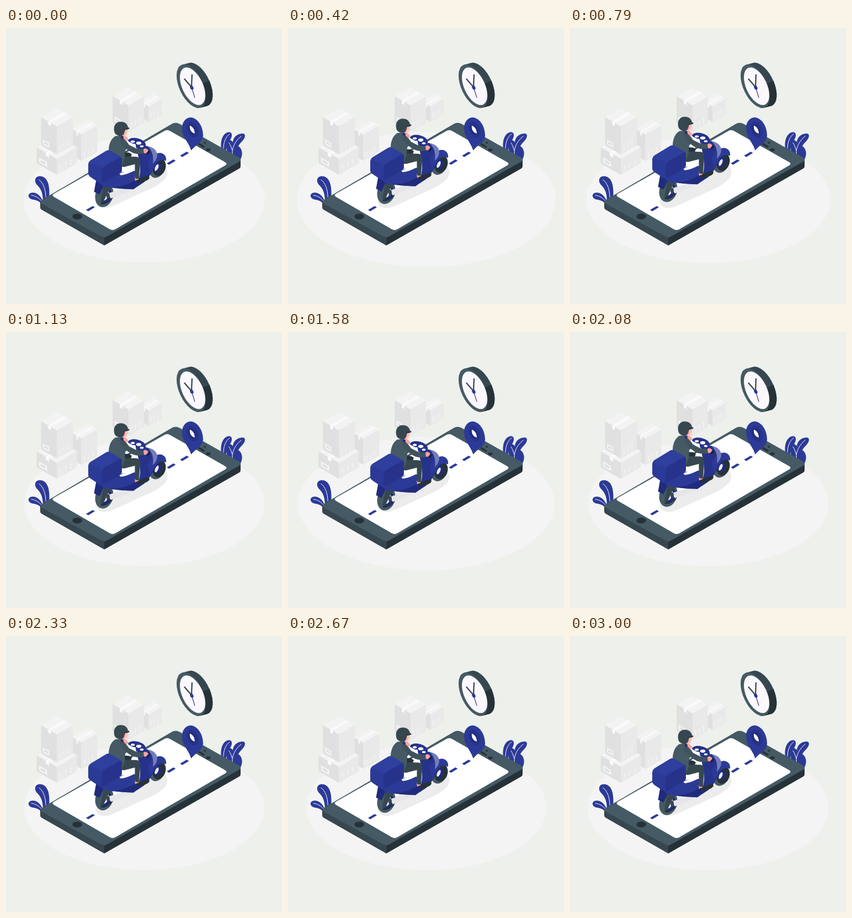
Recreate the animation shown at these times as an HTML page. Size 500 by 500 pixels, loop 3040 ms.

```html
<!DOCTYPE html>
<html lang="en">
<head>
<meta charset="utf-8">
<title>Delivery scooter</title>
<style>
  html, body { margin: 0; width: 100%; height: 100%; overflow: hidden; background: #edf0eb; }
  svg { display: block; width: 100vw; height: 100vh; }
  .lit { fill: #2f3f9d; }
  .blue { fill: #2c3a97; }
  .mid { fill: #27338a; }
  .navy { fill: #212b7c; }
  .slate { fill: #455a64; }
  .sleeve { fill: #40535c; }
  .steel { fill: #37474f; }
  .ink { fill: #263238; }
  .skin { fill: #fba39e; }
  .white { fill: #fff; }
  .vein { fill: none; stroke: #fff; stroke-width: 1; stroke-linecap: round; }
  .top { fill: #f3f3f3; }
  .left { fill: #e0e0e0; }
  .right { fill: #e9e9e9; }
  .tape { fill: #fafafa; }
  .mark { fill: none; stroke: #f6f6f6; stroke-width: .9; }
</style>
</head>
<body>
<svg viewBox="0 0 500 500" xmlns="http://www.w3.org/2000/svg">
  <defs>
    <clipPath id="lowerRim"><path d="M350 104L380 90V150H340Z"/></clipPath>
    <path id="rim" d="M319.300 66.500L332.800 63A21.500 42.400 -25 0 1 365.200 141L351.700 144.500Z"/>
  </defs>

  <ellipse id="floor" cx="250.500" cy="311" rx="217.500" ry="113.500" fill="#f4f4f4"/>
  <g id="parcels"></g>

  <g id="plants">
    <path class="blue" d="M78 311C80 292 78 269 62 268.500C52 268 50 278 57 285C65 293 67 302 67 316Z"/>
    <path class="vein" d="M72 306C72 292 67 280 60 275"/>
    <path class="blue" d="M68 319C65 304 55 297 46 298.500C39 300 39 308 47 310.500C55 312 60 313 64 319Z"/>
    <path class="vein" d="M65 314C59 307 53 304 46 303"/>
    <path class="blue" d="M391 224C387 208 391 190 404 188.500C411 189 410 197 406 203C400 210 400 217 398 228Z"/>
    <path class="vein" d="M394 218C394 207 398 197 405 192"/>
    <path class="blue" d="M399 229C402 222 398 215 401 208C403 202 408 202 411 207C411 198 420 190 431 191.500C435 194 432 201 428 205C424 209 422 211 421 214C426 217 431 226 425 238L418 238Z"/>
    <path class="vein" d="M410 228C409 216 416 204 426 196M409.500 221C408 215 406 211 404 208"/>
  </g>

  <g id="phone">
    <path class="steel" d="M62 314V325Q62 328 66 330L178 394V378Z"/>
    <path class="ink" d="M178 379L425 237V250Q425 253.500 421 255.500L178 394Z"/>
    <path class="slate" d="M68 309.500L300 174Q307 169.500 315 174L421 234Q429 239 421 243L186 376Q178 381 170 376L67 319.500Q58 315 68 309.500Z"/>
    <path class="white" d="M87 300L286 187Q292 183 298 187L397 243Q402 246 397 249L199 364Q193 368 187 364L87 306Q82 303 87 300Z"/>
    <ellipse class="ink" cx="129" cy="341.500" rx="9" ry="5.200"/>
    <path d="M350.500 210.500L358 215" stroke="#263238" stroke-width="3.600" stroke-linecap="round"/>
    <ellipse class="ink" cx="366.500" cy="220.700" rx="4.200" ry="2.600"/>
    <ellipse class="ink" cx="360.300" cy="208" rx="2.200" ry="1.400"/>
  </g>
  <g id="dashes" class="blue"></g>

  <g id="clock">
    <use href="#rim" class="steel"/>
    <use href="#rim" class="ink" clip-path="url(#lowerRim)"/>
    <ellipse class="slate" rx="21.500" ry="42.400" transform="translate(335.500 105.500) rotate(-25)"/>
    <ellipse fill="#faf8fc" rx="18.800" ry="36.600" transform="translate(338 105.500) rotate(-25)"/>
    <path d="M336 107L323.500 92.500M336 107L337 85" stroke="#37474f" stroke-width="2.300" stroke-linecap="round"/>
    <path d="M336 107L342 126" stroke="#2c3a97" stroke-width="1.200" stroke-linecap="round"/>
    <ellipse class="blue" rx="2.900" ry="4.200" transform="translate(336.500 108) rotate(-25)"/>
  </g>

  <path id="shadow" fill="#ececec" d="M162 312C163 324 172 328 186 325C202 320 222 309 242 300C264 291 284 281 291 269C295 259 290 250 282 248L252 262L196 290Z"/>

  <g id="pin">
    <path class="blue" d="M335.500 222C331 206 319 199 319 181C319 170 326 162 335 162C347 163 357 178 357 194C357 207 344 211 335.500 222Z"/>
    <ellipse class="mid" rx="10" ry="15" transform="translate(338 184) rotate(-22)"/>
    <ellipse class="navy" rx="6" ry="9.500" transform="translate(337 184) rotate(-22)"/>
    <path class="white" d="M333 177C338 178 342 184 342 191C336 190 332 184 333 177Z"/>
  </g>

  <g id="scooter">
    <g id="frontWheel">
      <ellipse class="slate" rx="13.500" ry="17.500" transform="translate(273 254.500) rotate(18)"/>
      <ellipse class="ink" rx="11.500" ry="16" transform="translate(277.500 252.500) rotate(18)"/>
      <ellipse class="navy" rx="6" ry="9.500" transform="translate(275 252.500) rotate(18)"/>
      <ellipse fill="#e8eaf2" rx="2.800" ry="6.500" transform="translate(273 253) rotate(24)"/>
    </g>
    <g id="rearWheel">
      <ellipse class="slate" rx="16" ry="22" transform="translate(178 303) rotate(16)"/>
      <path class="ink" d="M171 318C176 323 191 315 196 304L185 304Z"/>
      <ellipse class="navy" rx="8" ry="13" transform="translate(183 304) rotate(16)"/>
      <ellipse fill="#e8eaf2" rx="5" ry="10" transform="translate(180.500 303) rotate(20)"/>
    </g>
    <path class="navy" d="M164 272L159.500 297L169.500 302L177 286L192 280Z"/>
    <path class="steel" d="M177 285L193 288L185 297L176 316L171 315Z"/>
    <path fill="#e6e6ea" d="M184 300C198 296 208 291 232 289L230 293C218 298 206 304 190 309Z"/>
    <ellipse class="steel" cx="185" cy="304" rx="3" ry="5.500"/>

    <path class="blue" d="M172 283C180 275 195 267 211 261L234 259L237 274L262 261C260 273 250 280 240 285L230 292C214 292 194 291 177 287Z"/>
    <path class="navy" d="M190 288.500C206 289 222 284 238 274L259 269C256 278 245 282 231 292.500C216 292 203 291 190 288.500Z"/>
    <path class="mid" d="M238 214L256 214C267 220 276 231 272 246C266 257 262 268 254 275L240 276C245 262 243 245 239 230Z"/>
    <path class="blue" d="M257 246C261 233 271 226 280 226.500C288 228 291 234 290 241L285 239.500C275 238 268 248 261 264Z"/>
    <path fill="#747dbb" d="M257 214.500C267 216 274 222 274 231C273 239 269 243 266 246C268 233 265 223 257 214.500Z"/>
    <path class="white" d="M205 264C215 261 227 253 235 248L235 257C227 262 217 266 208 267Z"/>

    <g id="dashboard">
      <path class="mid" d="M221 204C224 197 239 198 248 204C255 209 255 216 248 219L236 218C229 216 222 211 221 204Z"/>
      <g class="white">
        <ellipse cx="229.700" cy="205.800" rx="3.600" ry="2"/>
        <ellipse cx="240.500" cy="208.600" rx="4.700" ry="2.800"/>
        <ellipse cx="246" cy="214.500" rx="3.300" ry="1.900"/>
        <ellipse cx="232" cy="211.500" rx="3" ry="1.800"/>
      </g>
    </g>

    <g id="rider">
      <path class="ink" d="M212 225L223 226L228 229L226 234L212 236Z"/>
      <path class="skin" d="M233 270L240.500 270L240 277L234 277Z"/>
      <path class="ink" d="M235 276.500C242 274 248 270 257 268C261 269 261 273 256 276C250 279 241 281 235 279Z"/>
      <path class="steel" d="M198 238L214 233L236 233.500C243 234 244 239 243 245L241 272.500Q237 274.500 233.500 272L233.500 247L214 252C206 252 200 247 198 238Z"/>
      <path class="white" d="M212 201L219 204L235 212.500L236 219L222 214Z"/>
      <path class="skin" d="M206 192L214 194L222 201L219 205L208 200Z"/>
      <path class="slate" d="M187 232C184 217 188 202 198 196L207 195C214 200 219 208 221 217L216 222L215 236L210 250L198 250Z"/>
      <path class="sleeve" d="M206 198C214 199 219 206 223 212L236 218.500L250 220L251 227Q241 230 231 227C221 223 213 215 208 208Z"/>
      <path class="navy" d="M208 194.500L213 197L212 202L208 199Z"/>
      <path class="skin" d="M249 220C252 217 256 219 257.500 222C257 226 253 228 250 227Z"/>
      <path d="M256.500 227.500L259.500 224" stroke="#1c2440" stroke-width="4" stroke-linecap="round"/>
      <path class="skin" d="M208 180L219 181L219.500 188C219.500 194 216 196 211 196L207 194Z"/>
      <path d="M217 184L218 191L214 195" fill="none" stroke="#fff" stroke-width="1.200" opacity=".65"/>
      <path class="steel" d="M196 187C194 176 200 170 208 170C215 170 220 174 221 180L224 181.500Q222 184 216 184.500C214 189 214 195 209 195.500C202 196 197 193 196 187Z"/>
      <path d="M214 184Q219 184 223 182" fill="none" stroke="#263238" stroke-width="1.400"/>
    </g>

    <g id="cargo">
      <path class="lit" d="M149 248Q149 243 153 240L181 223Q185 220.500 190 223L207 233Q211 236 210 241L208 262L176 281Q172 283 168 280L153 270Q149 267 149 263Z"/>
      <path class="mid" d="M173 259Q174 253 179 250L206 235Q210 234 210 238V258Q210 261 206 264L178 280Q173 283 173 277Z"/>
      <path class="blue" d="M149 248Q150 245 154 246L169 250Q174 252 173 259V277Q173 283 168 280L153 270Q149 267 149 263Z"/>
    </g>
  </g>
</svg>
<script>
  const byId = id => document.getElementById(id);
  const poly = (cls, points) => `<polygon class="${cls}" points="${points.join(' ')}"/>`;

  // Isometric carton: (x, y) is the near top corner, a and b its left and right widths.
  function carton(x, y, a, b, h, label) {
    const k = 0.575;
    const at = (u, v, z = 0) => [x - a * u + b * v, y - k * (a * u + b * v) + z];
    let out = poly('left', [at(1, 0), at(0, 0), at(0, 0, h), at(1, 0, h)])
      + poly('right', [at(0, 0), at(0, 1), at(0, 1, h), at(0, 0, h)])
      + poly('top', [at(0, 0), at(1, 0), at(1, 1), at(0, 1)])
      + poly('tape', [at(.55, 0), at(.38, 0), at(.38, 1), at(.55, 1)])
      + poly('tape', [at(.55, 0), at(.38, 0), at(.38, 0, 6), at(.55, 0, 6)]);
    if (label) {
      out += poly('top', [at(.88, 0, h - 13), at(.48, 0, h - 13), at(.48, 0, h - 4), at(.88, 0, h - 4)]);
      out += poly('left', [at(.8, 0, h - 10.5), at(.56, 0, h - 10.5), at(.56, 0, h - 6.5), at(.8, 0, h - 6.5)]);
    }
    for (const v of [.2, .45, .7]) {
      const [mx, my] = at(0, v, h - 5);
      out += `<path class="mark" d="M${mx} ${my}v-8m-2 3l2-3 2 1M${mx - 2} ${my + 1}l4-2"/>`;
    }
    return out;
  }

  byId('parcels').innerHTML =
    carton(258, 142, 16, 24, 28, false)
    + carton(222, 140, 29, 28, 48, true)
    + carton(136.5, 193, 16.5, 29, 48, false)
    + carton(92, 237, 36.5, 36.5, 29, true)
    + carton(92, 178, 28.5, 29, 51, true);

  byId('dashes').innerHTML = [[145, 329.6], [291.3, 245.3], [315.3, 231.3]]
    .map(([x, y]) => `<path d="M${x} ${y}l12-7.200 4 2.400-12 7.200z"/>`).join('');

  const LOOP = 3040, STEP = 1000 / 24, CYCLE = 3000, LEAD = 12;
  const beat = [[0, 1], [.1, 1.1], [.3, 1], [.4, 1], [.5, 1.1], [.6, 1], [1, 1]];

  function along(keys, p) {
    const i = keys.findIndex(([at]) => at > p);
    const [p0, v0] = keys[i - 1], [p1, v1] = keys[i];
    return v0 + (v1 - v0) * (p - p0) / (p1 - p0);
  }

  function draw(ms) {
    const step = Math.min(72, Math.floor((ms % LOOP + 5) / STEP));
    const p = (step * STEP + LEAD) % CYCLE / CYCLE;
    const lift = 10 * (1 - Math.abs(1 - 2 * (p * 2 % 1)));
    const scale = along(beat, p);
    byId('scooter').setAttribute('transform', `translate(0 ${-lift})`);
    byId('floor').setAttribute('rx', 217.5 * scale);
    byId('floor').setAttribute('ry', 113.5 * scale);
  }

  let start;
  function tick(now) {
    start ??= now;
    draw(now - start);
    requestAnimationFrame(tick);
  }
  draw(0);
  requestAnimationFrame(tick);
</script>
</body>
</html>
```
